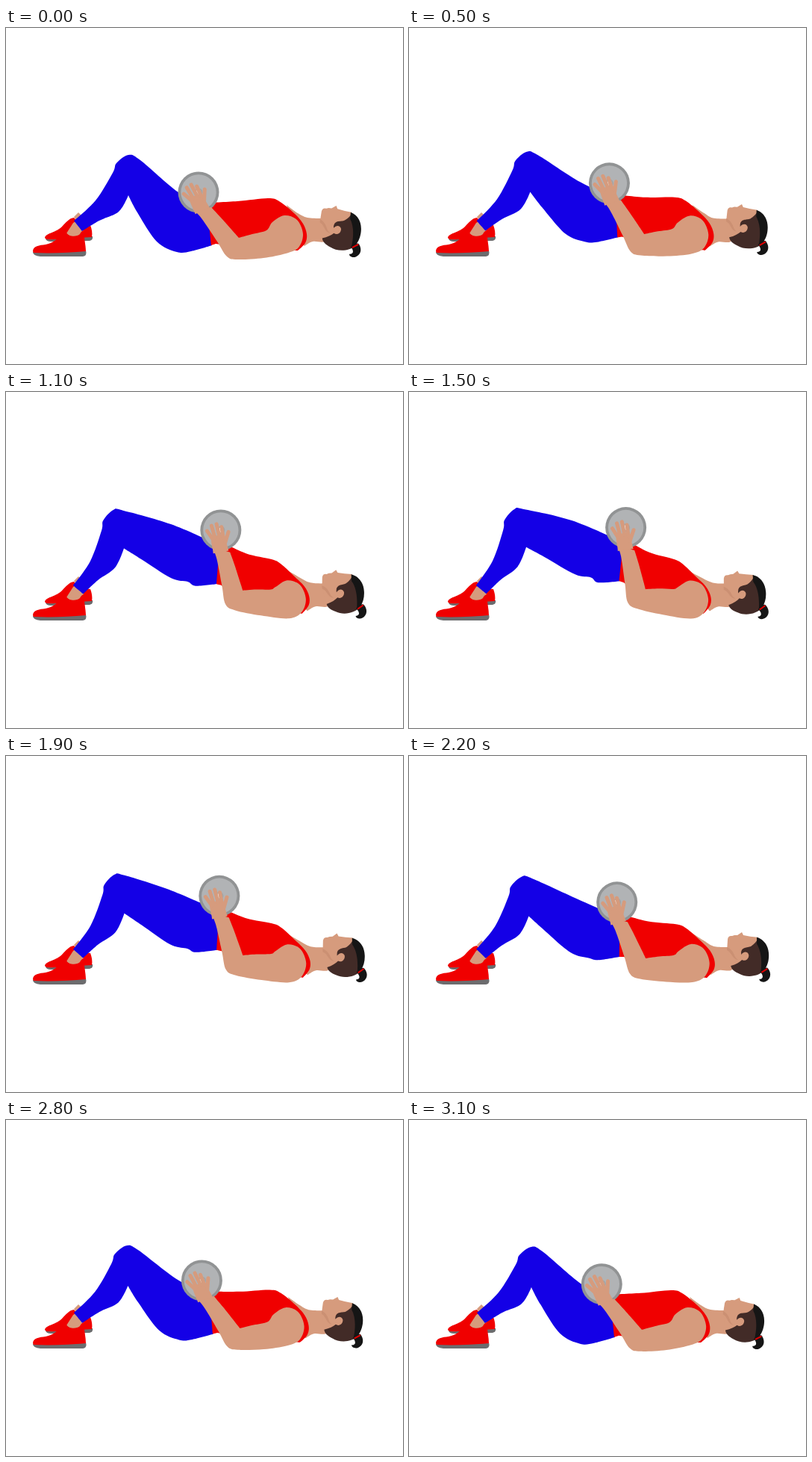
An HTML page that plays this animation: 532x450 px, repeating every 3.2 s.

```html
<!DOCTYPE html>
<html lang="en">
<head>
<meta charset="utf-8">
<title>Weighted glute bridge</title>
<style>
  html, body { margin: 0; width: 100%; height: 100%; overflow: hidden; background: #fff; }
  svg { display: block; width: 100vw; height: 100vh; }
  .skin { fill: #d69b7d; }
  .shade { fill: #cb9073; }
  .red { fill: #f00000; }
  .blue { fill: #1400e6; }
  .sole { fill: #6c6c6e; }
  .brown { fill: #422b27; }
  .black { fill: #151515; }
</style>
</head>
<body>
<svg viewBox="0 0 532 450">
  <g id="feet">
    <path class="sole" d="M53 282 L116 279 Q117 284 112 285 L60 286 Q54 286 53 282Z"/>
    <path class="red" d="M52 281 C53 275 66 274 74 267 C80 261 84 255 91 254 L98 262 L113 264 C115 269 116 275 115 280 C95 281 75 284 54 283Z"/>
    <path class="skin" d="M91 253 L97 247 L102 252 L95 259Z"/>
    <path class="skin" d="M90 261 L81 275 Q89 284 101 277 L104 270 L95 258Z"/>
    <path class="sole" d="M36 300 L107 298 Q109 305 103 306 L46 306 Q36 305 36 300Z"/>
    <path class="red" d="M36 299 C36 292 45 291 53 290 C64 288 70 281 77 275 L81 274 C84 280 95 280 99 276 Q102 270 105 272 C104 281 107 290 107 299 C85 301 60 302 37 301Z"/>
  </g>
  <path id="neck" class="skin"/>
  <g id="head">
    <path class="skin" d="M426 260 L427 245 Q428 240 433 241 L436 240 L440 240 L446 236 L448 240 Q457 242 467 243 L473 262 L452 287 L432 284Z"/>
    <path class="shade" d="M426 256 C431 258 434 262 436 267 C437 270 439 272 441 273 C436 273 434 269 432 266 Q430 262 426 260Z"/>
    <path class="brown" d="M467 246 C473 258 479 275 476 287 C468 296 452 297 443 292 C436 289 432 286 431 281 C438 279 443 276 446 273 C451 276 456 271 455 266 C453 261 448 262 445 266 C444 255 453 257 458 255 C463 252 465 249 467 246Z"/>
    <path class="black" d="M466 243 C476 246 482 255 482 267 C482 275 480 281 476 287 L471 290 C473 275 472 261 466 252Z"/>
    <path class="black" d="M470 289 C474 285 479 282 481 285 C486 292 484 299 478 302 C474 304 469 302 469 299 C475 299 475 294 470 289Z"/>
    <path d="M472 290 L480 285" stroke="#e00000" stroke-width="2"/>
  </g>
  <path id="pants" class="blue"/>
  <path id="shirt" class="red"/>
  <g id="plate">
    <circle r="27.5" fill="#919394"/>
    <circle r="23.7" fill="#b1b3b5"/>
    <circle r="5.5" fill="#a3a5a6"/>
    <circle r="3.2" fill="#eee"/>
  </g>
  <path id="arm" class="skin"/>
  <g id="hand">
    <path class="skin" d="M-11 4 C-10 -4 -12 -10 -10 -17 Q0 -21 8 -16 L10 4Z"/>
    <path d="M-8 -14 L-14 -27 M-5 -16 L-7 -33 M1 -16 L0 -34 M6 -14 L6 -29 M7 -7 L14 -21"
      fill="none" stroke="#d69b7d" stroke-width="5" stroke-linecap="round"/>
  </g>
</svg>
<script>
const LOOP = 3200, PEAK = 1400, STEP = 100;
const el = id => document.getElementById(id);

// Joints of the lying pose.
const ANKLE = [95, 264], KNEE = [161, 190], WAIST = [274, 265], CHEST = [390, 275];
const SHOULDER = [380, 275], ELBOW = [303, 295], WRIST = [262, 241], BROW = [446.5, 243];

// Key points of the lying pose, grouped by the bone that carries them; "!" is a sharp corner.
const outlines = {
  pants: `shin 91,258! 120,231 143,194 148,181 164,170
    thigh 180,177 231,220 pelvis 272,240! 276,291! 248,299
    seat 229,300 thigh 202,286 176,247 knee 164,224!
    shin 151,246 125,258 102,272!`,
  shirt: `torso 270,234! 310,232 351,228 366,232 386,248 398,262 403,276 401,288 391,298!
    320,295! 281,289! 275,291! 272,262`,
  neck: "chest 376,237! 391,248 shoulder 404,254 424,255! 434,275! 427,286 411,286 400,292! 390,280!",
  arm: `fore 250,243! 262,255 283,286 elbow 296,306 upper 310,310 345,308
    shoulder 375,302 392,294 398,276 390,257 373,251 357,260
    upper 349,271 330,276 elbow 312,281! fore 288,254 275,240!`
};

function parse(text) {
  let bone;
  return text.split(/\s+/).flatMap(word => {
    if (!word.includes(",")) { bone = word; return []; }
    return [{ bone, at: word.split(",").map(parseFloat), sharp: word.endsWith("!") }];
  });
}
const shapes = Object.entries(outlines).map(([id, text]) => [el(id), parse(text)]);

const shift = ([x, y], dx, dy) => [x + dx, y + dy];

// Rotates around a joint and carries that joint to a new place.
function turn([cx, cy], deg, [tx, ty] = [cx, cy]) {
  const c = Math.cos(deg * Math.PI / 180), s = Math.sin(deg * Math.PI / 180);
  return ([x, y]) => [tx + (x - cx) * c - (y - cy) * s, ty + (x - cx) * s + (y - cy) * c];
}

function blend(f, g, weight) {
  return p => {
    const w = weight(p), a = f(p), b = g(p);
    return a.map((v, i) => v + (b[i] - v) * w);
  };
}

const half = () => .5;
const alongTorso = ([x]) => Math.max(0, Math.min(1, (x - WAIST[0]) / (CHEST[0] - WAIST[0])));

// All bones for a lift of 0 (lying) to 1 (bridge); the body sways sideways midway.
function pose(lift) {
  const sway = 12 * lift * (1 - lift);
  const shin = turn(ANKLE, -13 * lift);
  const thigh = turn(KNEE, -27 * lift, shin(KNEE));
  const pelvis = turn(WAIST, 12 * lift, shift(WAIST, 12 * lift + sway, -38 * lift));
  const chest = turn(CHEST, -7 * lift, shift(CHEST, lift + 2 * sway, -lift));
  const socket = shift(SHOULDER, 3 * lift + sway, 1.5 * lift);
  const shoulder = turn(SHOULDER, 0, socket);
  const upper = turn(SHOULDER, 16.5 * lift, socket);
  const fore = turn(ELBOW, 26 * lift, upper(ELBOW));
  return {
    shin, thigh, pelvis, chest, shoulder, upper, fore, sway,
    knee: blend(shin, thigh, half),
    seat: blend(thigh, pelvis, half),
    elbow: blend(upper, fore, half),
    torso: blend(pelvis, chest, alongTorso)
  };
}

// Closed curve through the points, straight between sharp corners.
function smoothPath(pts) {
  const n = pts.length, get = i => pts[(i + n) % n];
  const handle = (i, side) => get(i).at.map((v, k) =>
    get(i).sharp ? v : v + side * (get(i + 1).at[k] - get(i - 1).at[k]) / 6);
  const curves = pts.map((_, i) =>
    "C" + [...handle(i, 1), ...handle(i + 1, -1), ...get(i + 1).at].map(v => v.toFixed(2)).join(" "));
  return `M${pts[0].at.join(" ")}${curves.join("")}Z`;
}

function place(id, [x, y], deg, [px, py] = [0, 0]) {
  el(id).setAttribute("transform", `translate(${x} ${y}) rotate(${deg} ${px} ${py})`);
}

function draw(t) {
  const phase = t < PEAK ? t / PEAK : (LOOP - t) / (LOOP - PEAK);
  const lift = (1 - Math.cos(Math.PI * phase)) / 2;
  const bones = pose(lift);
  for (const [node, pts] of shapes) {
    node.setAttribute("d", smoothPath(pts.map(p => ({ at: bones[p.bone](p.at), sharp: p.sharp }))));
  }
  const wrist = bones.fore(WRIST);
  place("hand", wrist, 16 * lift - 24);
  place("plate", shift(wrist, 4.5 * lift - 4, -21 - 5 * lift), 0);
  place("head", [1.7 * bones.sway - 4 - 1.5 * lift, 2 + 1.5 * lift - bones.sway], 5 - 9 * lift, BROW);
}

const start = performance.now();
function tick() {
  const t = (performance.now() - start) % LOOP;
  draw(Math.floor(t / STEP) * STEP);
  requestAnimationFrame(tick);
}
tick();
</script>
</body>
</html>
```
